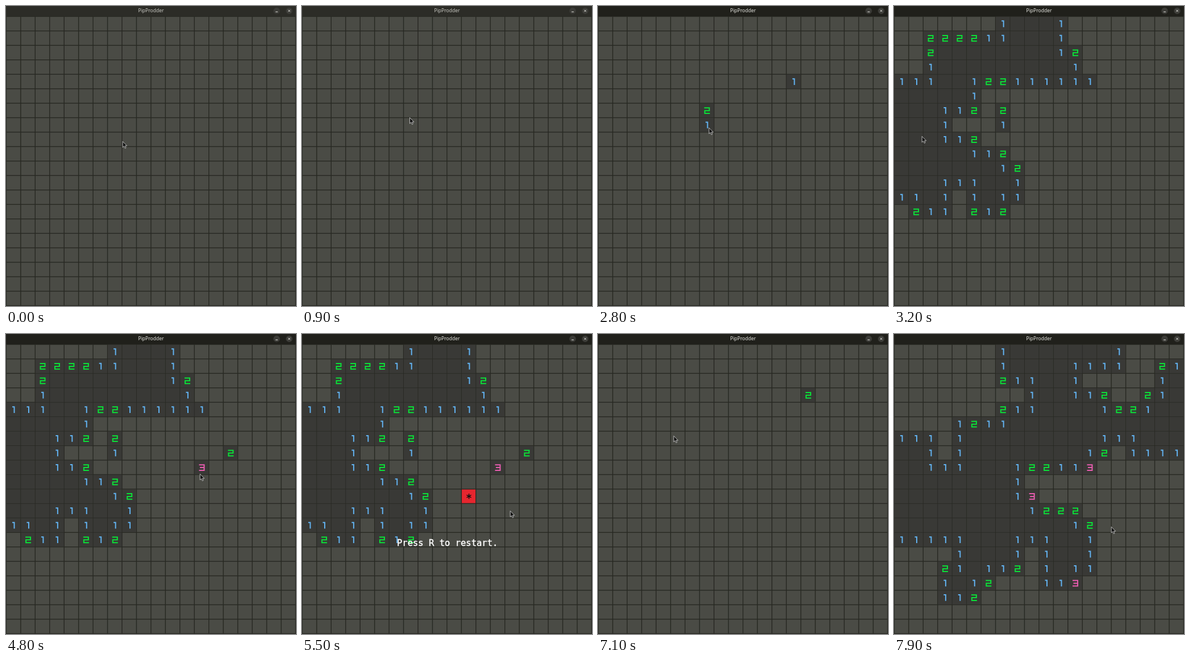
Recreate the animation shown at these times as an HTML page. Size 510 by 528 pixels, loop 8 s.

```html
<!DOCTYPE html>
<html lang="en">
<head>
<meta charset="utf-8">
<title>PipProdder</title>
<style>
html, body { margin: 0; width: 100%; height: 100%; overflow: hidden; background: #272822; }
svg { display: block; width: 510px; height: 528px; }
.title { font: 500 8.5px "Noto Sans", "Open Sans", sans-serif; text-anchor: middle; }
.prompt { font: 15.5px "DejaVu Sans Mono", monospace; fill: #fff; stroke: #fff; stroke-width: .4; }
</style>
</head>
<body>
<svg viewBox="0 0 510 528">
  <rect id="bar" width="510" height="18"/>
  <text id="title" class="title" x="255" y="11.3">PipProdder</text>
  <g fill="#3b3b37"><circle cx="476" cy="8.5" r="5.7"/><circle cx="498" cy="8.5" r="5.7"/></g>
  <path d="M474 10.3h4M496.2 6.7l3.6 3.6m0-3.6l-3.6 3.6" stroke="#e4e4df" fill="none"/>
  <g id="tiles"></g>
  <g id="marks" fill="none"></g>
  <text id="prompt" class="prompt" x="167" y="372.6">Press R to restart.</text>
  <path id="cursor" d="M-.8-.6v10.5l2.4-2.2 1.6 3.7 1.8-.8-1.6-3.5h3.3z" fill="#111" stroke="#ddd" stroke-width=".8"/>
</svg>
<script>
const LOOP = 8000, STEP = 100, PAUSE = 100, RESTART = 6000;
const SIZE = 20, PITCH = 25.45, LEFT = .4, TOP = 18.4;

// Cursor stops; a click lands one pause after arrival, then the cursor moves on.
const stop = (t, x, y, click = false) => ({ t, x, y, click });
const press = (t, x, y) => stop(t, x, y, true);
const route = [
  stop(0, 206, 239), press(1700, 185, 183), press(2300, 343, 130), press(2700, 196, 215),
  press(3100, 50, 230), press(4000, 394, 207), press(4700, 342, 247), press(5200, 291, 282),
  stop(5500, 367, 312), stop(5900, 367, 312), press(6500, 367, 106), press(7100, 134, 180),
  stop(7700, 355, 325), stop(7900, 383, 340)
];
const FOCUS = route[1].t + PAUSE;

// Columns of the mines, row by row; every digit and opened area follows from them.
const games = [
  newGame(0, RESTART, [[3, 4, 6], [1, 12], [], [1, 13], [], [6, 7, 10], [], [4, 16], [6, 14],
    [8, 12, 13], [9, 11], [], [4], [0, 8], [1, 6]]),
  newGame(RESTART, LOOP, [[16, 18], [6], [13, 17], [8, 15, 16], [4, 6], [0], [], [3, 15], [14, 18],
    [9, 10, 13, 14], [10, 11], [13], [], [14], [0, 3, 9], [], [2, 7, 13], [6, 11, 13], [5]])
];

const glyphs = {
  1: { color: "#62b2f0", d: "M-2.6-4.8H.9V6" },
  2: { color: "#0be038", d: "M-5-4.6H4V.3H-4V5.2H5" },
  3: { color: "#e65cae", d: "M-5-4.6H4V5.2H-5M-3.5.3H4" },
  "*": { color: "#111", d: "M0-4.6V4.6M-4-2.3L4 2.3M-4 2.3L4-2.3" }
};

function neighbours(col, row) {
  const near = [];
  for (let r = row - 1; r <= row + 1; r++)
    for (let c = col - 1; c <= col + 1; c++)
      if (r >= 0 && c >= 0 && r < SIZE && c < SIZE) near.push([c, r]);
  return near;
}

function newGame(from, until, mines) {
  const isMine = (col, row) => !!mines[row]?.includes(col);
  const valueOf = (col, row) => isMine(col, row) ? "*"
    : neighbours(col, row).filter(([c, r]) => isMine(c, r)).length;
  const opened = new Map();
  let overAt = Infinity;

  function open(col, row, t) {
    const key = row * SIZE + col;
    if (opened.has(key)) return;
    const value = valueOf(col, row);
    opened.set(key, { t, value });
    if (value === "*") overAt = t;
    if (value === 0) neighbours(col, row).forEach(([c, r]) => open(c, r, t));
  }

  for (const { t, x, y, click } of route)
    if (click && t >= from && t < until)
      open(Math.floor((x - LEFT) / PITCH), Math.floor((y - TOP) / PITCH), t + PAUSE);
  return { opened, overAt };
}

const byId = id => document.getElementById(id);
const set = (node, attrs) => {
  for (const name in attrs) node.setAttribute(name, attrs[name]);
  return node;
};
const add = (parent, tag) =>
  parent.appendChild(document.createElementNS("http://www.w3.org/2000/svg", tag));

const cells = Array.from({ length: SIZE * SIZE }, (_, i) => {
  const x = LEFT + i % SIZE * PITCH, y = TOP + Math.floor(i / SIZE) * PITCH;
  const mark = set(add(byId("marks"), "path"), {
    transform: `translate(${x + PITCH / 2 + .5} ${y + PITCH / 2})`
  });
  return { x, y, mark, tile: add(byId("tiles"), "rect") };
});

function drawCell(cell, value) {
  if (cell.value === value) return;
  cell.value = value;
  const inset = value >= 0 ? .4 : .7;
  const fill = value === "#" ? "#4a4b45" : value === "*" ? "#e6262f" : "#393936";
  const side = PITCH - 2 * inset;
  set(cell.tile, { x: cell.x + inset, y: cell.y + inset, width: side, height: side, fill });
  const glyph = glyphs[value];
  set(cell.mark, {
    d: glyph ? glyph.d : "",
    stroke: glyph ? glyph.color : "none",
    "stroke-width": value === "*" ? 1.5 : 2
  });
}

function cursorAt(t) {
  const next = route.findIndex(p => p.t > t);
  if (next < 0) return route[route.length - 1];
  const a = route[next - 1], b = route[next];
  const k = Math.max(0, (t - a.t - PAUSE) / (b.t - a.t - PAUSE));
  const eased = k * (2 - k);
  return { x: a.x + (b.x - a.x) * eased, y: a.y + (b.y - a.y) * eased };
}

function render(t) {
  const focused = t >= FOCUS;
  set(byId("bar"), { fill: focused ? "#20201b" : "#2c2c27" });
  set(byId("title"), { fill: focused ? "#e6e6e1" : "#c9c9c3" });
  const game = games[t < RESTART ? 0 : 1];
  cells.forEach((cell, i) => {
    const found = game.opened.get(i);
    drawCell(cell, found && t >= found.t ? found.value : "#");
  });
  set(byId("prompt"), { visibility: t >= game.overAt ? "visible" : "hidden" });
  const { x, y } = cursorAt(t);
  set(byId("cursor"), { transform: `translate(${x} ${y})` });
}

const start = performance.now();
function tick(now) {
  const t = Math.max(0, now - start) % LOOP;
  render(Math.floor(t / STEP) * STEP);
  requestAnimationFrame(tick);
}
render(0);
requestAnimationFrame(tick);
</script>
</body>
</html>
```
